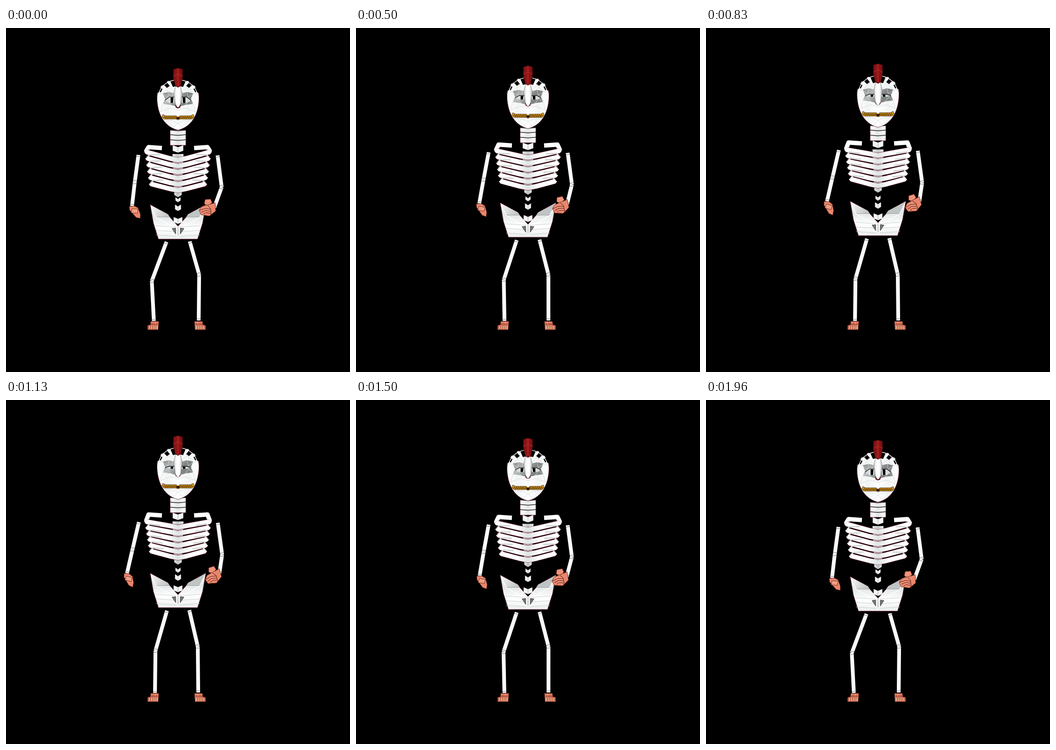
Recreate the animation shown at these times as an HTML page with a canvas. Size 748 by 748 pixels, loop 2000 ms.

```html
<!DOCTYPE html>
<html>
<head>
<meta charset="utf-8">
<style>
html, body { margin: 0; height: 100%; background: #000; overflow: hidden; }
canvas { display: block; }
</style>
</head>
<body>
<canvas id="stage" width="748" height="748"></canvas>
<script>
const c = document.getElementById('stage').getContext('2d');
const MID = 374;
const SKIN = '#e9866c', DARK = '#571b14', PALE = '#f7b9a2', RIM = '#6d2030';
let q = 0; // 0 = crouched, 1 = stretched
const mix = (a, b) => a + (b - a) * q;
const pose = (x0, y0, x1, y1) => [mix(x0, x1), mix(y0, y1)];

function trace(pts) {
  c.beginPath();
  for (let i = 0; i < pts.length; i += 2) c.lineTo(pts[i], pts[i + 1]);
}
function paint(fill, edge) {
  c.closePath();
  c.fillStyle = fill;
  c.fill();
  if (edge) { c.strokeStyle = edge; c.lineWidth = 0.8; c.stroke(); }
}
function poly(fill, pts, edge) {
  trace(pts);
  paint(fill, edge);
}
function line(color, width, ...pts) {
  trace(pts);
  c.strokeStyle = color;
  c.lineWidth = width;
  c.stroke();
}
function flip(pts) {
  const out = [];
  for (let i = pts.length - 2; i >= 0; i -= 2) out.push(2 * MID - pts[i], pts[i + 1]);
  return out;
}
const whole = half => [...half, ...flip(half)];
function pair(fill, pts, edge) {
  poly(fill, pts, edge);
  poly(fill, flip(pts), edge);
}
function pairLine(color, width, ...pts) {
  line(color, width, ...pts);
  line(color, width, ...flip(pts));
}
function at([x, y], angle, draw) {
  c.save();
  c.translate(x, y);
  c.rotate(angle);
  draw();
  c.restore();
}
function shade(x0, y0, x1, y1, ...colors) {
  const g = c.createLinearGradient(x0, y0, x1, y1);
  colors.forEach((s, i) => g.addColorStop(i / (colors.length - 1), s));
  return g;
}

function bone(a, b) {
  const dx = b[0] - a[0], dy = b[1] - a[1], len = Math.hypot(dx, dy);
  at(a, Math.atan2(dy, dx), () => {
    line('#fcfafc', 8.2, 0, 0, len, 0);
    for (const x of [3, len - 4]) line('#666', 0.8, x, -4, x + 1, 4);
  });
}
function limb(a, b, d) {
  bone(a, b);
  bone(b, d);
}

function foot(side) {
  c.save();
  c.translate(371, 638);
  c.scale(side, 1);
  poly('#df765c', [39, 0, 56, 0, 57, 8, 63, 8, 63, 18, 40, 18]);
  line(PALE, 1, 46, 1, 46, 7);
  line(DARK, 1, 41, 6, 56, 6, 63, 9);
  for (let x = 43; x < 63; x += 4) {
    line('#f4c79f', 2, x, 10, x, 16);
    line(DARK, 0.8, x + 2, 9, x + 2, 17);
  }
  c.restore();
}

function legs() {
  limb(pose(349, 465, 350, 458), pose(317, 550, 325, 545), pose(321.5, 637, 324, 637));
  limb(pose(399.5, 464, 398.5, 457), pose(420, 536, 417, 536), pose(419, 636, 418, 636));
  foot(-1);
  foot(1);
}

function leftArm() {
  const wrist = pose(274, 387, 263, 377);
  limb(pose(288, 276, 289, 265.5), pose(280, 335, 275, 325), wrist);
  at(wrist, 0.19 * q, () => {
    poly(SKIN, [-6, 1, 5, 0, 13, 4, 18, 17, 18, 27, 9, 25, -5, 9], DARK);
    poly('#f09a80', [0, 6, 13, 7, 12, 16, -2, 15], DARK);
    line(PALE, 1, 1, 8, 12, 9);
  });
}

function rightArm() {
  const wrist = pose(453, 390, 464, 377);
  limb(pose(460, 277, 460.5, 267), pose(469, 346, 470, 336), wrist);
  at(wrist, -0.23 * q, () => {
    poly('#ee937a', [-20, -17, -8, -18, -5, -10, -14, -3, -22, -8], DARK);
    poly(SKIN, [-33, 6, -27, -2, 2, -10, 3, 8, -11, 19, -29, 16], DARK);
    for (let d = 0; d < 12; d += 4.5) {
      line(DARK, 1, d - 32, 6 + d, -19, 2 + d, -8, 4 + d);
      line(PALE, 0.8, d - 29, 3 + d, -19, d, -9, 2 + d);
    }
    line(DARK, 1, -14, -4, -8, 3, -7, 16);
  });
}

function pelvis() {
  c.save();
  c.translate(0, -7.5 * q);
  poly(shade(0, 385, 0, 459, '#f2f4f4', '#e2e6e7', '#fff', '#eceeee'),
    whole([MID, 431, 356, 411, 352, 405, 313.5, 384, 320.5, 424, 331.5, 459]), RIM);
  pair(shade(320, 390, 350, 412, '#f0f0f0', '#bfc4c5'), [315, 386, 352, 405, 356, 411, 327, 411]);
  pairLine('#909494', 0.8, 327, 411, 356, 411);
  pairLine('#fff', 1.5, 316, 390, 327, 412, 362, 432, MID, 434);
  for (let y = 430; y < 455; y += 10) pairLine('#c0c5c5', 0.8, 326, y, 370, y + 3);
  pair('#777', [361, 436, 369, 435, 369, 448], '#222');
  line('#888', 1, MID, 432, MID, 451);
  c.restore();
}

function vertebra(y, h, w) {
  poly('#f4f5f5', whole([MID, y + 4, MID - w, y, MID - w, y + h - 4, MID, y + h]));
  line('#999', 0.8, MID, y + 4, MID, y + h);
}

function chest() {
  c.save();
  c.translate(0, -10 * q);
  c.lineJoin = 'round';
  poly(shade(362, 0, 386, 0, '#eee', '#bfc4c5', '#eee'), whole([MID, 274, 362, 274, 366, 363, MID, 368]));
  vertebra(255, 16, 11.5);
  const tone = shade(299, 0, 449, 0, '#fff', '#fff', '#fff', '#dfe4e5', '#fff', '#fff', '#fff');
  for (let i = 0; i < 6; i++) {
    const x = 305 + 2 * i, mid = 286 + 13.2 * i;
    const y = mid - mix(17 - 0.7 * i, 12 + 0.4 * i);
    // The topmost end bends into the collar bone
    const hook = i ? [x + 28, y - 8 + 4 * q, x + 5, y - 7] : [339, 261, 310, 259];
    const end = [x, y - 2, x + 2, y + 1];
    pairLine(i ? '#d4d7d7' : '#fff', i ? 3 : 9.5, ...hook, ...end);
    const rib = whole([...end, MID - 18, mid - 2.5, MID, mid + 1]);
    line(RIM, 11.4, ...rib);
    line(tone, 10, ...rib);
  }
  c.restore();
}

function neck() {
  const y = mix(222, 212);
  poly(shade(357, 0, 391, 0, '#fff', '#e4e6e6', '#fff'), whole([357, y, 357, y + 33]), RIM);
  for (const d of [0, 10, 21]) line('#222', 1.6, 357, y + d, MID, y + d + 1.5, 391, y + d);
}

function eyes() {
  pair(shade(340, 143, 370, 170, '#8b8f8f', '#b6baba', '#808484'),
    [341, 142, 354, 139, 367, 142, 372, 171, 357, 167, 341, 165, 346, 154]);
  pairLine('#e0e3e3', 0.8, 341, 143, 352, 151, 354, 139);
  pairLine('#e0e3e3', 0.8, 341, 165, 351, 158, 359, 168);
  const top = mix(151, 153), low = mix(163, 157), side = (top + low) / 2;
  pair('#d8dbdb', [346, side, 355, top, 366, top, 366, low, 354, low]);
  pair('#000', [358, top, 364, top, 363, low, 358, low]);
  pairLine('#111', 1.2, 346, side, 355, top - 1, 366, top - 1);
}

function mouth() {
  poly('#d4941c', whole([MID, 194, 370, 191, 347, 191, 341, 188, 339, 193, 343, 198, 370, 198, MID, 200]), '#2e1a02');
  pairLine('#3a2404', 0.9, 341, 194.5, 373, 195);
  for (let x = 345; x < 373; x += 4) {
    pairLine('#3a2404', 0.9, x, 191, x, 194.5);
    pairLine('#3a2404', 0.9, x + 2, 194.5, x + 2, 198);
  }
  pair('#1c0d04', [371, 193, MID, 195, MID, 198, 371, 198]);
}

function skull() {
  const rx = 45.5, ry = 40, cy = 150;
  c.beginPath();
  c.ellipse(MID, cy, rx, ry, 0, Math.PI, 0);
  c.bezierCurveTo(420, 180, 408, 214, MID, 222);
  c.bezierCurveTo(340, 214, 328, 180, MID - rx, cy);
  paint(shade(329, 0, 419, 0, '#fff', '#f2f4f4', '#fff', '#f2f4f4', '#fff'), RIM);
  // Dark windows around the crown
  for (const deg of [17, 40, 66]) {
    const spot = (r, d) => {
      const a = (deg + d) * Math.PI / 180;
      return [MID - rx * r * Math.sin(a), cy - ry * r * Math.cos(a)];
    };
    const inner = 0.5 + 0.0055 * deg;
    pair('#000', [...spot(inner, 7), ...spot(inner, -7), ...spot(0.92, -6), ...spot(0.92, 6)]);
    pair('#000', [...spot(0.96, 10), ...spot(0.96, -8), ...spot(1.03, -8), ...spot(1.03, 10)]);
  }
  pairLine('#d0d4d5', 0.8, 330, 142, 341, 143, 355, 129, 366, 141);
  pairLine('#d0d4d5', 0.8, 341, 166, 336, 182, 357, 174, MID, 179);
  pairLine('#d0d4d5', 0.8, 346, 201, 361, 201, MID, 207, 364, 217);
}

function head() {
  c.save();
  c.translate(0, -11.76 * q);
  c.scale(1, 1 + 0.026 * q);
  skull();
  eyes();
  const tip = mix(172, 175);
  poly('#541015', whole([368, 167, 369, 173, MID, 175]));
  poly(shade(366, 0, 382, 0, '#ddd', '#fff', '#fff', '#c9cccc'),
    whole([369, 124, 365, 143, 368, tip - 8, 372, tip]), '#777');
  mouth();
  poly(shade(364, 0, 384, 0, '#7d1113', '#961819', '#6d0d10'),
    whole([MID, 87, 364, 90, 364, 108, 368, 126, MID, 129]), '#3d070b');
  line('#c22f2b', 1, MID, 89, MID, 125);
  line('#c22f2b', 1, 364, 105, MID, 100, 384, 105);
  c.restore();
}

function draw(now) {
  const step = Math.floor((now % 2000) * 0.024 + 0.15) % 48;
  q = (1 - Math.cos(step / 47 * 2 * Math.PI)) / 1.9;
  c.fillStyle = '#000';
  c.fillRect(0, 0, 748, 748);
  legs();
  neck();
  head();
  chest();
  vertebra(mix(368, 364.5), 11, 5.5);
  vertebra(mix(384, 379), 14, 6.5);
  pelvis();
  vertebra(mix(411, 403), 15, 9.5);
  leftArm();
  rightArm();
}

const start = performance.now();
function tick() {
  draw(performance.now() - start);
  requestAnimationFrame(tick);
}
tick();
</script>
</body>
</html>
```
